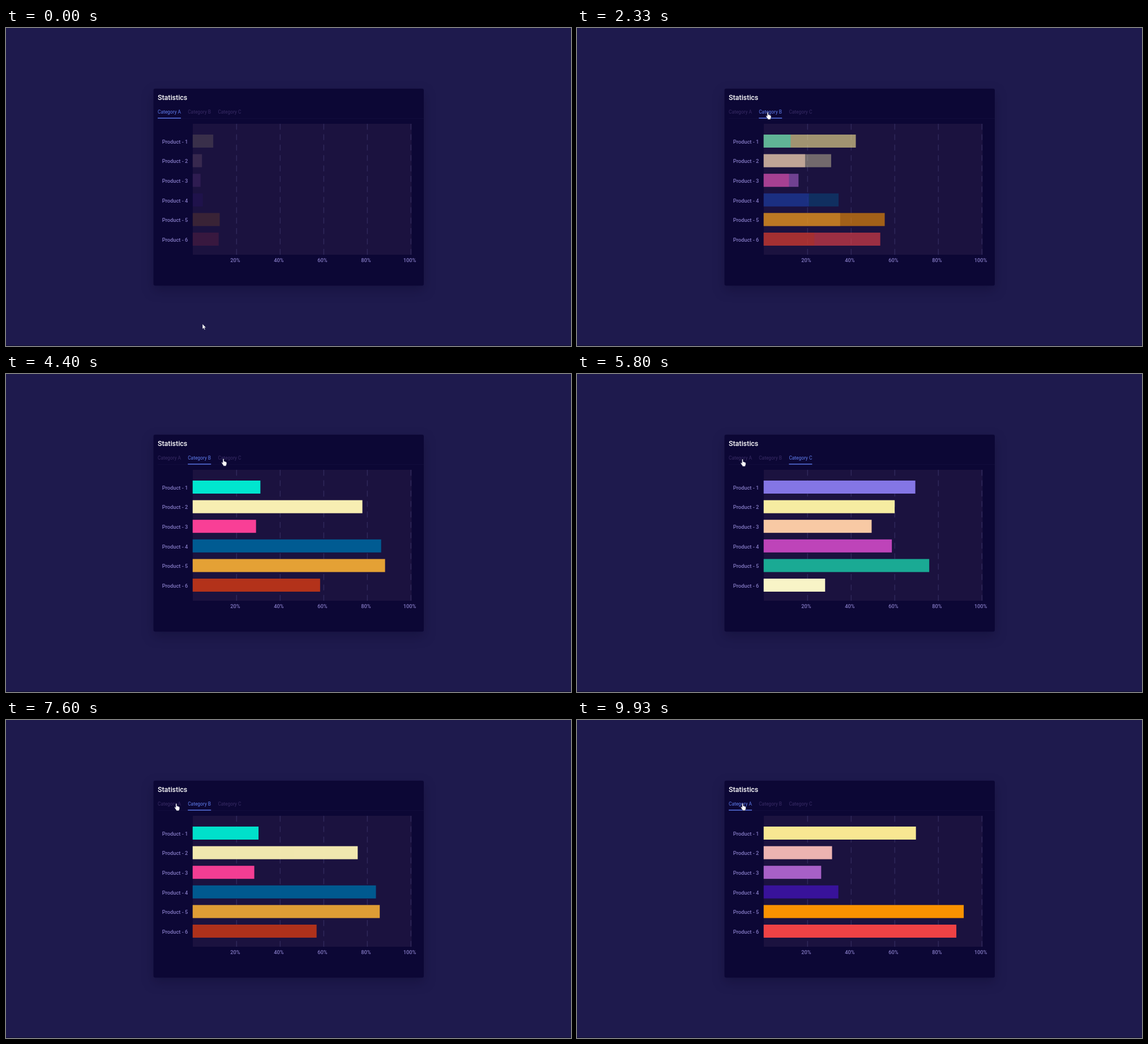
An HTML page that plays this animation: 998 by 561 pixels, repeating every 9990 ms.

```html
<!DOCTYPE html>
<html lang="en">
<head>
<meta charset="utf-8">
<title>Statistics</title>
<style>
html, body { margin: 0; width: 100%; height: 100%; overflow: hidden; background: #1e1a4d; }
svg { display: block; width: 998px; height: 561px; font-family: Roboto, sans-serif; }
#card { filter: drop-shadow(0 8px 10px rgba(5, 2, 35, .3)); }
.title { font-size: 12.4px; font-weight: 500; fill: #fff; }
.tab { font-size: 8.35px; fill: #392c66; }
.tab.on { fill: #617ff0; }
.label { font-size: 9.3px; font-weight: 500; fill: #8379c2; }
</style>
</head>
<body>
<svg id="stage" viewBox="0 0 998 561">
  <rect width="998" height="561" fill="#1e1a4d"/>
  <rect y="560" width="998" height="1" fill="#12102f"/>
  <rect id="card" x="260.5" y="107" width="477.5" height="347.5" rx="3" fill="#0c0735"/>
  <text class="title" x="268" y="127.3">Statistics</text>
  <rect x="268" y="159" width="470" height="1" fill="#120d3c"/>
  <g id="tabs"></g>
  <rect id="line" y="158.3" width="41" height="1.4" fill="#5f7df0"/>
  <rect x="330" y="169" width="386.5" height="231" fill="#1b123f"/>
  <g id="grid" stroke="#30285a" stroke-width="1.5" stroke-dasharray="10.4 8"></g>
  <g id="labels"></g>
  <g id="bars"></g>
  <g id="cursor">
    <path id="arrow" d="M0 0V9.2L2.1 7.3L3.5 10.4L5 9.7L3.6 6.7H6.4Z" fill="#fff" stroke="#15123a" stroke-width=".5"/>
    <path id="hand" d="M-1 .8Q-1 -.5 0 -.5T1 .8V4Q2.4 3.5 2.8 4.6Q4.1 4.2 4.4 5.2Q5.8 5 5.8 6.4V8.6Q5.7 10 4.9 10.8V12.2H-.1V11Q-1.4 9.6 -2.2 8.2L-3.2 6.4Q-3.2 5.2 -2 5.6L-1 6.8Z" fill="#fff" stroke="#15123a" stroke-width=".5"/>
  </g>
</svg>
<script>
(() => {
  const LOOP = 9990, LEFT = 330, PERCENT = 3.85, ROW = 34.6, SPEED = 0.006;
  const $ = id => document.getElementById(id);

  const sets = [
    { name: "A", values: [70, 31.4, 26.4, 34.3, 92, 88.6],
      colors: ["#f9e893", "#edb4b2", "#a861c8", "#39129b", "#fb9300", "#f04346"] },
    { name: "B", values: [31, 77.8, 29, 86.4, 88.2, 58.4],
      colors: ["#00e6cf", "#f7eeb2", "#f93f96", "#005b92", "#e4a135", "#b3321a"] },
    { name: "C", values: [69.7, 60.2, 49.6, 58.9, 76.1, 28.2],
      colors: ["#8577e6", "#f7eda2", "#f9caa5", "#bf45ba", "#1aab95", "#f9f5c8"] }
  ];
  const [A, B, C] = sets;

  const clicks = [
    { at: -105, set: A }, { at: 2103, set: B }, { at: 4450, set: C },
    { at: 6692, set: B }, { at: 8600, set: A }
  ];

  // pointer moves: [start, duration, x, y]; it rests in between
  const home = [347, 522];
  const moves = [
    [0, 1100, 345.5, 514], [1150, 250, 346, 521],
    [1450, 270, 306, 330], [1720, 280, 337, 149],
    [3150, 350, 384, 150], [4500, 420, 317, 155], [5100, 650, 292.3, 150.8],
    [6050, 250, 286, 126], [6300, 340, 338, 149], [7100, 690, 292.5, 147.5]
  ];

  function add(parent, tag, attrs, text) {
    const el = document.createElementNS("http://www.w3.org/2000/svg", tag);
    for (const key in attrs) el.setAttribute(key, attrs[key]);
    if (text) el.textContent = text;
    parent.appendChild(el);
    return el;
  }

  function label(x, y, anchor, text) {
    add($("labels"), "text", { class: "label", x, y, "text-anchor": anchor }, text);
  }

  for (let v = 20; v <= 100; v += 20) {
    const x = LEFT + v * PERCENT;
    add($("grid"), "line", { x1: x + .3, x2: x + .3, y1: 169, y2: 400 });
    label(x - 2, 413.4, "middle", v + "%");
  }
  for (let i = 0; i < 6; i++) label(321.4, 203.7 + ROW * i, "end", "Product - " + (i + 1));

  sets.forEach((set, n) => {
    set.x = 268 + 53.2 * n;
    set.tab = add($("tabs"), "text", { x: set.x, y: 151 }, "Category " + set.name);
    set.group = add($("bars"), "g", {});
    set.bars = set.colors.map((fill, i) =>
      add(set.group, "rect", { x: LEFT - .3, y: 188 + ROW * i, height: 23, fill }));
  });

  // critically damped spring from 0 to 1
  function spring(ms) {
    const u = ms * SPEED;
    return 1 - (1 + u) * Math.exp(-u);
  }

  function showSet(set, p, active) {
    set.group.setAttribute("opacity", p);
    set.bars.forEach((bar, i) => bar.setAttribute("width", set.values[i] * PERCENT * p + .3));
    set.tab.setAttribute("class", active ? "tab on" : "tab");
  }

  function pointerAt(t) {
    let [x, y] = home;
    for (const [start, time, toX, toY] of moves) {
      const u = Math.min(1, Math.max(0, (t - start) / time));
      const e = u * u * (3 - 2 * u);
      x += (toX - x) * e;
      y += (toY - y) * e;
    }
    return [x, y];
  }

  let front = null;
  function draw(t) {
    const n = clicks.filter(c => c.at <= t).length - 1;
    const now = clicks[n].set;
    const old = n > 0 ? clicks[n - 1].set : null;
    const p = spring(t - clicks[n].at);
    for (const set of sets)
      showSet(set, set === now ? p : set === old ? 1 - p : 0, set === now);
    if (front !== now) $("bars").appendChild(now.group);
    front = now;
    $("line").setAttribute("x", now.x);

    const [x, y] = pointerAt(t);
    const overTab = y > 139 && y < 161;
    $("cursor").setAttribute("transform", `translate(${x} ${y})`);
    $("hand").setAttribute("visibility", overTab ? "visible" : "hidden");
    $("arrow").setAttribute("visibility", overTab ? "hidden" : "visible");
  }

  const start = performance.now();
  function tick() {
    draw((performance.now() - start) % LOOP);
    requestAnimationFrame(tick);
  }
  tick();
})();
</script>
</body>
</html>
```
